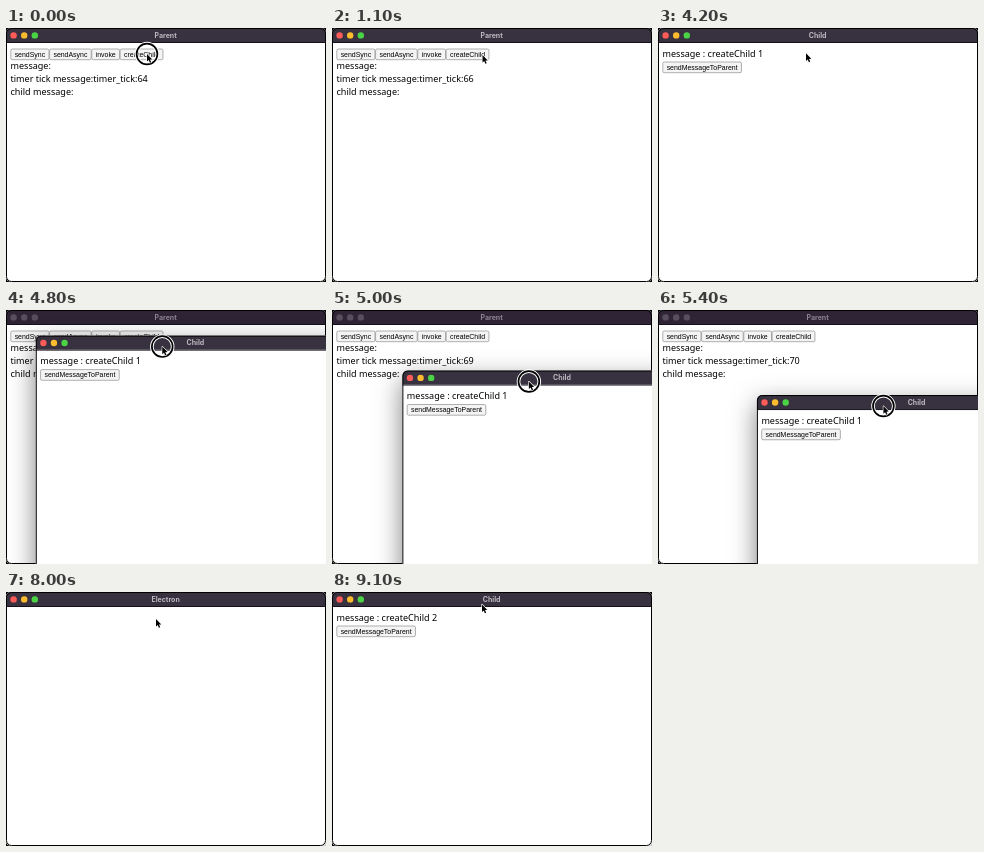
Recreate the animation shown at these times as an HTML page with a canvas. Size 320 px wide and 254 px high, loop 9200 ms.

```html
<!DOCTYPE html>
<html lang="en">
<head>
<meta charset="utf-8">
<title>Parent and child windows</title>
<style>
  html, body { margin: 0; width: 100%; height: 100%; overflow: hidden; background: #000; }
  canvas { display: block; width: 320px; height: 254px; }
</style>
</head>
<body>
<canvas id="stage" width="320" height="254"></canvas>
<script>
const ctx = document.getElementById('stage').getContext('2d');
const W = 320, H = 254, LOOP = 9200, STEP = 100;
const BODY_FONT = '9.05px "Noto Sans", sans-serif';
const BUTTON_FONT = '6.95px "Liberation Sans", Arial, sans-serif';
const TITLE_FONT = '700 7px Inter, sans-serif';

const clamp = k => Math.max(0, Math.min(1, k));
const smooth = k => k * k * (3 - 2 * k);
const easeOut = k => 1 - (1 - k) ** 3;
const progress = (t, start, end, ease = smooth) => ease(clamp((t - start) / (end - start)));

function text(string, x, y, font, color = '#000', align = 'left') {
  ctx.font = font;
  ctx.fillStyle = color;
  ctx.textAlign = align;
  ctx.fillText(string, x, y);
}

function circle(x, y, r) {
  ctx.beginPath();
  ctx.arc(x, y, r, 0, Math.PI * 2);
}

function box(x, y, w, h, r) {
  ctx.beginPath();
  ctx.roundRect(x, y, w, h, r);
}

function stroke(color, width) {
  ctx.strokeStyle = color;
  ctx.lineWidth = width;
  ctx.stroke();
}

// Draws a button as wide as its label and returns its right edge.
function button(label, x, y) {
  ctx.font = BUTTON_FONT;
  const w = ctx.measureText(label).width + 8.3;
  box(x + .3, y + .4, w - .6, 10.7, 1.5);
  ctx.fillStyle = '#f4f4f4';
  ctx.fill();
  stroke('#7c7c7c', .6);
  text(label, x + w / 2, y + 8.2, BUTTON_FONT, '#000', 'center');
  return x + w;
}

function drawWindow(x, y, title, active, content) {
  ctx.save();
  ctx.translate(x, y);

  ctx.save();
  ctx.shadowColor = `rgba(0,0,0,${active ? .5 : .35})`;
  ctx.shadowBlur = active ? 26 : 13;
  ctx.shadowOffsetY = active ? 9 : 4;
  box(0, 0, W, H, 5);
  ctx.fillStyle = '#fff';
  ctx.fill();
  ctx.restore();

  ctx.save();
  ctx.clip();
  ctx.fillStyle = active ? '#38313f' : '#2e2436';
  ctx.fillRect(0, 0, W, 14);
  ctx.fillStyle = '#15101a';
  ctx.fillRect(0, 14, W, 1);
  ['#fc5b57', '#fdbc2e', '#4bd346'].forEach((color, i) => {
    circle(7.6 + i * 10.6, 7.4, 3.2);
    ctx.fillStyle = active ? color : '#574e5d';
    ctx.fill();
  });
  text(title, 159.6, 9.8, TITLE_FONT, active ? '#bdb8c1' : '#8b8391', 'center');
  content();
  ctx.restore();

  box(.5, .5, W - 1, H - 1, 5);
  stroke('#000', 1);
  ctx.restore();
}

function drawParent(active, tick) {
  drawWindow(0, 0, 'Parent', active, () => {
    ['sendSync', 'sendAsync', 'invoke', 'createChild'].reduce(
      (x, label) => button(label, x, 20.6), 4.5);
    ['message:', 'timer tick message:timer_tick:' + tick, 'child message:'].forEach(
      (line, i) => text(line, 4.5, 41.4 + i * 12.7, BODY_FONT));
  });
}

function drawChild(x, y, number, age, active) {
  drawWindow(x, y, age < 200 ? 'Electron' : 'Child', active, () => {
    if (age < 400) return;
    text('message : createChild ' + number, 4.5, 28.7, BODY_FONT);
    button('sendMessageToParent', 4.5, 33.6);
  });
}

function drawRing(x, y, alpha) {
  ctx.globalAlpha = alpha;
  circle(x, y, 10.4);
  stroke('#fff', 3.6);
  stroke('#000', 1.7);
  ctx.globalAlpha = 1;
}

function drawCursor(x, y) {
  ctx.save();
  ctx.translate(x, y);
  const arrow = new Path2D('M0 0V7.6L1.7 6.1 2.9 8.8 4.2 8.2 3 5.6 5.3 5.4Z');
  ctx.lineJoin = 'round';
  ctx.strokeStyle = '#fff';
  ctx.lineWidth = 1.2;
  ctx.stroke(arrow);
  ctx.fillStyle = '#000';
  ctx.fill(arrow);
  ctx.restore();
}

// The ring shows while the mouse is down and fades after release.
function ringAlpha(t) {
  const press = (down, up) => t < down ? 0 : clamp(1 - (t - up) / 200);
  return Math.max(press(0, 0), press(4700, 5400), press(6900, 7000));
}

function cursorAt(t, dragX, dragY) {
  const toButton = progress(t, 300, 600);
  const toTitleBar = progress(t, 4150, 4400);
  const back = progress(t, 5600, 6200);
  const settle = progress(t, 7100, 7400);
  const leave = progress(t, 8700, 9100);
  return [
    141 + 9.5 * toButton - 24 * toTitleBar + dragX - 74.5 * back - 2 * settle,
    26 + toButton - 16 * toTitleBar + dragY - 65 * back - 5 * settle - 14.5 * leave,
  ];
}

function draw(t) {
  ctx.fillStyle = '#000';
  ctx.fillRect(0, 0, W, H);

  const drag = progress(t, 4700, 5600, easeOut);
  const dragX = 100 * drag, dragY = 86 * drag;
  const tick = 64 + Math.floor((t + 900) / 1000);
  const parentActive = t < 2500 || t >= 6900;

  drawParent(parentActive, tick);
  if (t >= 2500) drawChild(dragX, dragY, 1, t - 2500, !parentActive);
  if (t >= 7900) drawChild(0, 0, 2, t - 7900, true);

  const [x, y] = cursorAt(t, dragX, dragY);
  drawRing(x, y, ringAlpha(t));
  drawCursor(x, y);
}

const start = performance.now();
function frame() {
  const t = (performance.now() - start) % LOOP;
  draw(Math.floor(t / STEP) * STEP);
  requestAnimationFrame(frame);
}
frame();
</script>
</body>
</html>
```
